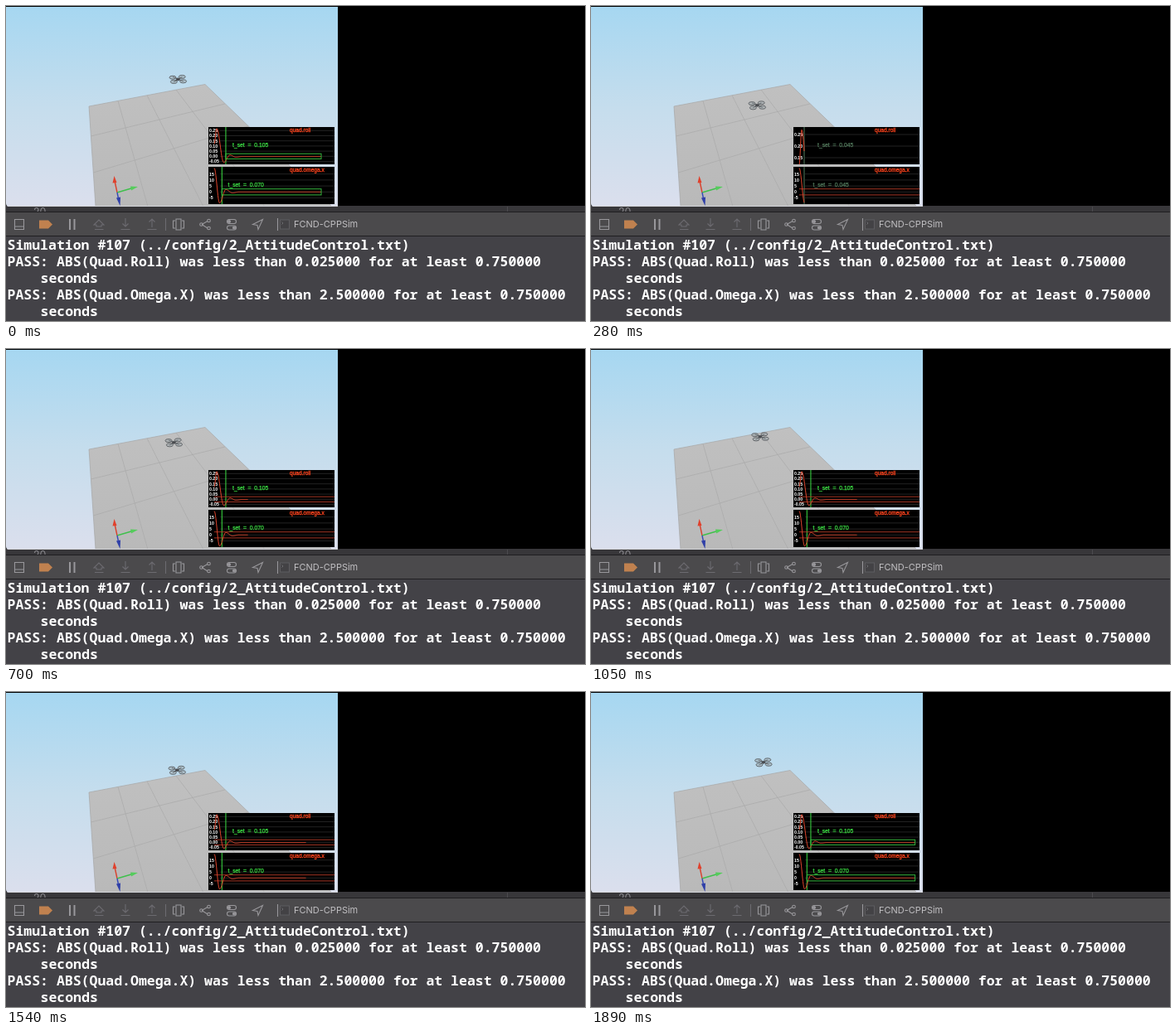
An HTML page that plays this animation: 698 px wide and 380 px high, repeating every 1.96 s.

```html
<!DOCTYPE html>
<html lang="en">
<head>
<meta charset="utf-8">
<title>Attitude control simulation</title>
<style>
  html, body { margin: 0; width: 100%; height: 100%; overflow: hidden; background: #000; }
  svg { display: block; width: 698px; height: 380px; }
  .console { font: bold 16.5px "Noto Sans Mono", "DejaVu Sans Mono", monospace; fill: #fff; white-space: pre; }
  .app { font: 11px Inter, sans-serif; fill: #c0bfc2; }
  .tick { font: bold 5.2px "Liberation Sans", sans-serif; fill: #fff; }
  .name { font: 6.6px "Liberation Sans", sans-serif; fill: #f0401c; stroke: #f0401c; stroke-width: .35; }
  .set { font: 6.8px "Liberation Sans", sans-serif; stroke-width: .25; white-space: pre; }
  .grid { stroke: #2c2c2c; stroke-width: .8; }
  .limit { stroke: #b43a28; stroke-width: .9; }
  .curve { fill: none; stroke: #e0452c; stroke-width: 1; }
  .box { fill: none; stroke: #35b53d; stroke-width: 1; }
  .icon { fill: none; stroke: #98979b; stroke-width: 1.1; }
  .dim { stroke: #6c6b70; }
</style>
</head>
<body>
<svg viewBox="0 0 698 380">
  <defs>
    <linearGradient id="sky" x1="0" y1="0" x2="0" y2="1">
      <stop offset="0" stop-color="#a6d7f1"/>
      <stop offset=".5" stop-color="#c5dded"/>
      <stop offset="1" stop-color="#dbdfed"/>
    </linearGradient>
    <linearGradient id="floor" x1="0" y1="0" x2="0" y2="1">
      <stop offset="0" stop-color="#c0c0c0"/>
      <stop offset="1" stop-color="#b9b9b9"/>
    </linearGradient>
    <clipPath id="view"><path d="M0 1H400V242H4Q0 242 0 238Z"/></clipPath>
  </defs>
  <rect width="698" height="380"/>
  <rect y="241" width="698" height="8" fill="#38373a"/>

  <g clip-path="url(#view)">
    <rect y="1" width="400" height="241" fill="url(#sky)"/>
    <path d="M100 121L240 94.5L393 242H108Z" fill="url(#floor)" stroke="#a6a6a6" stroke-width=".7"/>
    <path d="M135 114.4L171 242M170 107.8L238 242M205 101L312 242M102.400 157L264 118M105.300 201L292 145"
          fill="none" stroke="#aaa" stroke-width=".7"/>
    <g stroke-width="1.4">
      <path d="M134 225L131 211" stroke="#d8402c"/>
      <path d="M134 225L151 220" stroke="#3fc04c"/>
      <path d="M134 225L135.500 232" stroke="#3448b8"/>
      <path d="M130.500 205L133.500 213L128.500 213.500Z" fill="#e0402c" stroke="none"/>
      <path d="M159 218L151 222.500L150 217.500Z" fill="#55cc5c" stroke="none"/>
      <path d="M137.500 241L133 231.500L138 230.500Z" fill="#2f3fa8" stroke="none"/>
    </g>
    <g id="drone" stroke="#515559" stroke-width=".8">
      <path d="M-6 -3L7 2.500M5.500 -3.200L-5 3.100" stroke-width="1.1"/>
      <g fill="#9aa3a8" fill-opacity=".5">
        <ellipse cx="-6" cy="-2.400" rx="4" ry="2"/>
        <ellipse cx="5.300" cy="-3.200" rx="4" ry="2"/>
        <ellipse cx="-4.600" cy="2.800" rx="4" ry="2.100"/>
        <ellipse cx="6.600" cy="2.200" rx="4" ry="2.100"/>
      </g>
      <ellipse cx=".3" cy="-.2" rx="2" ry="1.500" fill="#484a4e"/>
    </g>
    <g id="plots"></g>
    <path d="M0 241.500H400" stroke="#d4d5da"/>
  </g>

  <text x="33" y="253" font-family="Inter, sans-serif" font-size="12.500" fill="#87868b">20</text>
  <path d="M604.500 242V248" stroke="#4b4a4e"/>
  <rect y="248" width="698" height="30" fill="#4b4a4c"/>
  <rect y="278" width="698" height="102" fill="#434247"/>
  <path d="M0 248.500H698M0 277.500H698" stroke="#1f1e21"/>

  <g class="icon">
    <path d="M10.500 257.500H21.500V269.500H10.500ZM10.500 266H21.500"/>
    <path d="M40 258.500H51L56 263.500L51 268.500H40Z" fill="#c0814f" stroke="none"/>
    <path d="M77 257V270M82.500 257V270" stroke-width="2"/>
    <g class="dim">
      <path d="M106 264L112 258L118 264H115V266H109V264ZM107 269.500H117.500"/>
      <path d="M144 256V266M140.500 262.500L144 266L147.500 262.500M138.500 269.500H149.500"/>
      <path d="M176 267V257M172.500 260.500L176 257L179.500 260.500M170.500 269.500H181.500"/>
      <path d="M192.500 256V271"/>
    </g>
    <path d="M205 257H211V270H205ZM204 259H201.500V268H204M212 259H214.500V268H212"/>
    <path d="M236 263.500L243 259.500M236 263.500L243 268"/>
    <circle cx="235.500" cy="263.500" r="1.800"/><circle cx="244.500" cy="259" r="1.800"/>
    <circle cx="244.500" cy="268" r="1.800"/>
    <rect x="266.500" y="257.500" width="11" height="5" rx="2.500"/>
    <rect x="266.500" y="265" width="11" height="5" rx="2.500"/>
    <circle cx="269" cy="260" r="1.500" fill="#98979b"/><circle cx="275" cy="267.500" r="1.500" fill="#98979b"/>
    <path d="M297.500 263.500L309.500 257.500L304 269.500L303 264.500Z"/>
    <path d="M327.500 256V271"/>
    <path d="M330.500 258H341.500V269H330.500Z" fill="#434245" stroke="#5d5c60"/>
    <path d="M332.500 260.500L334 262L332.500 263.500" stroke="#77767a" stroke-width=".8"/>
  </g>
  <text class="app" x="347" y="267.300">FCND-CPPSim</text>

  <g class="console">
    <text x="1.500" y="294">Simulation #107 (../config/2_AttitudeControl.txt)</text>
    <text x="1.500" y="314">PASS: ABS(Quad.Roll) was less than 0.025000 for at least 0.750000</text>
    <text x="41.500" y="334">seconds</text>
    <text x="1.500" y="354">PASS: ABS(Quad.Omega.X) was less than 2.500000 for at least 0.750000</text>
    <text x="41.500" y="374">seconds</text>
  </g>
</svg>
<script>
const LOOP = 1960, STEP = 70, RESET = 210;
const LEFT = 244, RIGHT = 396, START = 251, PX_PER_S = 133;
const root = document.getElementById("plots");
const drone = document.getElementById("drone");

function add(parent, tag, attrs, text) {
  const el = document.createElementNS("http://www.w3.org/2000/svg", tag);
  set(el, attrs);
  if (text) el.textContent = text;
  parent.appendChild(el);
  return el;
}
function set(el, attrs) {
  for (const k in attrs) el.setAttribute(k, attrs[k]);
}
const clamp = v => Math.max(0, Math.min(1, v));

// Cosine blend between the turning points of a damped response.
function valueAt(points, x) {
  for (let i = 1; i < points.length; i++) {
    const [x0, v0] = points[i - 1], [x1, v1] = points[i];
    if (x <= x1) return v0 + (v1 - v0) * (1 - Math.cos(Math.PI * clamp((x - x0) / (x1 - x0)))) / 2;
  }
  return points[points.length - 1][1];
}

function makePlot(o) {
  const id = "clip" + o.top;
  const clip = add(root, "clipPath", { id });
  add(clip, "rect", { x: LEFT, y: o.top, width: RIGHT - LEFT, height: 45 });
  const g = add(root, "g", { "clip-path": `url(#${id})` });
  add(g, "rect", { x: LEFT, y: o.top, width: RIGHT - LEFT, height: 45, fill: "#000" });
  const scales = o.scales.map(s => {
    const layer = add(g, "g", {});
    for (const v of s.ticks) {
      const y = s.y(v);
      add(layer, "line", { class: "grid", x1: 258, x2: RIGHT, y1: y, y2: y });
      add(layer, "text", { class: "tick", x: 245, y: y + 1.9 }, v.toFixed(o.digits));
    }
    return { y: s.y, layer };
  });
  const line = () => add(g, "line", {});
  const p = { ...o, scales, mark: line(), limits: [line(), line()] };
  p.limits.forEach(l => set(l, { class: "limit", x1: LEFT + 7, x2: RIGHT }));
  p.curve = add(g, "path", { class: "curve" });
  p.box = add(g, "rect", { class: "box" });
  add(g, "text", { class: "name", x: 342, y: o.top + 5.8 }, o.name);
  p.label = add(g, "text", { class: "set", x: o.labelX, y: o.top + 23.5 });
  return p;
}

const rollY = v => 181.3 - v * 124;
const rollZoomY = v => 155 + (0.25 - v) * 280;
const omegaY = v => 224.3 - v * 1.44;

const plots = [
  makePlot({
    name: "quad.roll", top: 146, digits: 2, labelX: 273, settle: 0.105, limit: 0.025,
    scales: [
      { y: rollY, ticks: [0.25, 0.2, 0.15, 0.1, 0.05, 0, -0.05] },
      { y: rollZoomY, ticks: [0.25, 0.2, 0.15] }
    ],
    points: [[251, 0.12], [254, 0.27], [262.5, -0.06], [270, 0.012], [277, -0.008], [285, -0.002]]
  }),
  makePlot({
    name: "quad.omega.x", top: 194, digits: 0, labelX: 267.5, settle: 0.07, limit: 2.5,
    scales: [{ y: omegaY, ticks: [15, 10, 5, 0, -5] }],
    points: [[251, 20], [257.5, -9.3], [265, 2], [273, -0.8], [281, 0]]
  })
];

function drawPlot(p, end, passed, zoomed) {
  const pick = zoomed && p.scales.length > 1 ? 1 : 0;
  const y = p.scales[pick].y;
  p.scales.forEach((s, i) => set(s.layer, { display: i === pick ? "inline" : "none" }));

  const now = (end - START) / PX_PER_S;
  const settle = Math.min(now, p.settle);
  const x = START + settle * PX_PER_S;
  const k = clamp((now - 0.1) / 0.18);
  const mix = (a, b) => Math.round(a + (b - a) * k);
  const green = `rgb(${mix(82, 60)},${mix(122, 225)},${mix(92, 68)})`;
  set(p.mark, { x1: x, x2: x, y1: p.top, y2: p.top + 45, stroke: green, "stroke-width": 1 });
  set(p.label, { fill: green, stroke: green });
  p.label.textContent = "t_set  =  " + settle.toFixed(3);

  const hi = y(p.limit), lo = y(-p.limit);
  [hi, lo].forEach((v, i) => set(p.limits[i], { y1: v, y2: v, display: passed ? "none" : "inline" }));
  set(p.box, { x, y: hi, width: Math.max(0, end - x), height: lo - hi, display: passed ? "inline" : "none" });

  let d = "";
  for (let px = START; px <= end; px += 0.5) {
    d += (d ? "L" : "M") + px + " " + y(valueAt(p.points, px)).toFixed(2);
  }
  set(p.curve, { d });
}

function draw(ms) {
  const t = Math.floor((ms % LOOP) / STEP) * STEP;
  // The run restarts shortly after the loop begins.
  const u = t < RESET ? t + 1482 : t - 280;
  const end = 257 + u * 0.083;
  const x = 200 + u * 0.0047;
  const y = 120 - u * 0.0149 - u * u * 4.24e-6;
  set(drone, { transform: `translate(${x.toFixed(2)} ${y.toFixed(2)})` });
  for (const p of plots) drawPlot(p, end, u >= 1330, u < 70);
}

let begin;
function tick(now) {
  begin ??= now;
  draw(now - begin);
  requestAnimationFrame(tick);
}
draw(0);
requestAnimationFrame(tick);
</script>
</body>
</html>
```
